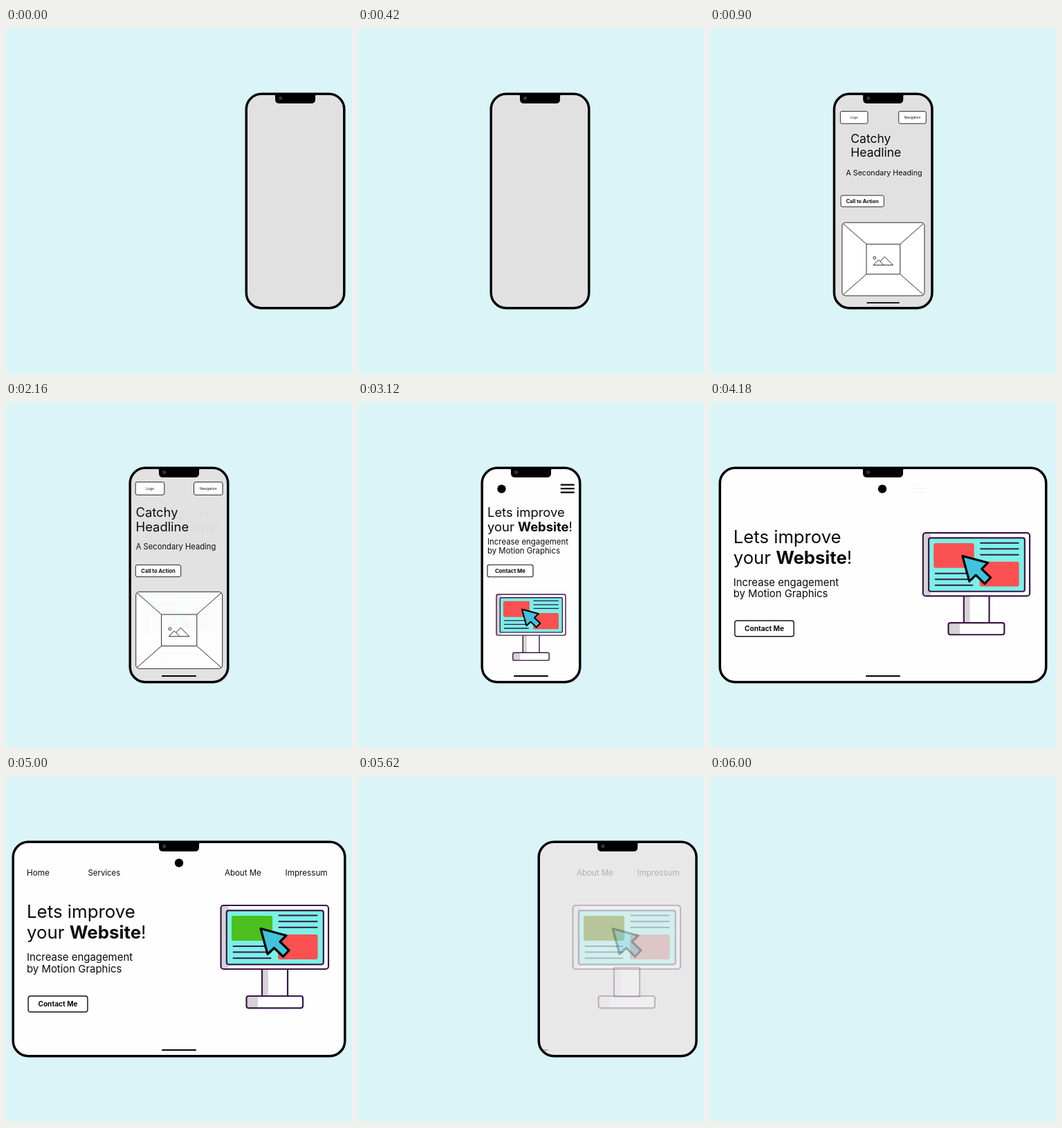
These frames come from a looping animation (500 px wide and 500 px high, 6020 ms). An HTML page with a canvas:

```html
<!DOCTYPE html>
<html lang="en">
<head>
<meta charset="utf-8">
<title>Responsive page</title>
<style>
html, body { margin: 0; width: 100%; height: 100%; overflow: hidden; background: #daf4f8 }
canvas { display: block }
</style>
</head>
<body>
<canvas id="stage" width="500" height="500"></canvas>
<script>
const ctx = document.getElementById('stage').getContext('2d');
const LOOP = 6020, SKY = '#daf4f8', INK = '#3a1648', RED = '#fb5052';

// Critically damped spring from 0 to 1.
const spring = (ms, rate = 10) => {
  const u = Math.max(0, ms) / 1000 * rate;
  return 1 - (1 + u) * Math.exp(-u);
};
const mix = (a, b, p) => a + (b - a) * p;
const grey = v => `rgb(${v},${v},${v})`;

function box(x, y, w, h, r, fill, stroke, width = 1) {
  ctx.beginPath();
  ctx.roundRect(x, y, w, h, r);
  paint(fill, stroke, width);
}
function paint(fill, stroke, width) {
  if (fill) { ctx.fillStyle = fill; ctx.fill(); }
  if (stroke) { ctx.strokeStyle = stroke; ctx.lineWidth = width; ctx.stroke(); }
}
function shape(d, fill, stroke, width) {
  const path = new Path2D(d);
  if (fill) { ctx.fillStyle = fill; ctx.fill(path); }
  if (stroke) { ctx.strokeStyle = stroke; ctx.lineWidth = width; ctx.stroke(path); }
}
function dot(x, y, r, fill, stroke, width) {
  ctx.beginPath();
  ctx.arc(x, y, r, 0, 7);
  paint(fill, stroke, width);
}
function text(s, x, y, size, weight = 400, align = 'left') {
  ctx.font = `${weight} ${size}px Inter, sans-serif`;
  ctx.textAlign = align;
  ctx.fillStyle = '#0a0a0a';
  ctx.fillText(s, x, y);
}
function group(alpha, draw) {
  if (alpha < 0.004) return;
  ctx.save();
  ctx.globalAlpha *= alpha;
  draw();
  ctx.restore();
}
function place(x, y, scale, draw) {
  ctx.save();
  ctx.translate(x, y);
  ctx.scale(scale, scale);
  draw();
  ctx.restore();
}

function homeBar(scale, y) {
  box(250 - 25 * scale, y - 0.9, 50 * scale, 1.8, 0.9, '#000');
}

function wireframe(p) {
  const away = 1 - p;
  // Each part grows around its centre while it travels in from (dx, dy).
  const part = (x, y, dx, dy, draw) => {
    if (p > 0.002) place(x + dx * away, y + dy * away, p, draw);
  };
  const label = (x, s) => part(x, 125, 0, 90, () => {
    box(-20.8, -9.3, 41.6, 18.6, 2.5, '#fff', '#222');
    text(s, 0, 1.8, 4.9, 400, 'center');
  });
  label(208, 'Logo');
  label(292.3, 'Navigation');
  part(227, 171, 290, 0, () => {
    text('Catchy', -39.5, -5, 18.4);
    text('Headline', -39.5, 16, 18.4);
  });
  part(245.5, 209, 122, 0, () => text('A Secondary Heading', 0, 3.8, 11.2, 400, 'center'));
  part(220, 244, 0, 130, () => {
    box(-32.7, -8.6, 65.4, 17.2, 2.5, '#fff', '#222');
    text('Call to Action', 0, 2.8, 7.6, 700, 'center');
  });
  part(250.2, 329.8, 0, 90, () => {
    box(-62.5, -55.5, 125, 111, 5, '#fff', '#222');
    box(-25.6, -22.8, 51.2, 45.6, 0, null, '#222');
    shape('M-61-54L-25.6-22.8M61-54L25.6-22.8M-61 54L-25.6 22.8M61 54L25.6 22.8' +
      'M-15.2 9L-7 1L1 9ZM-4.5 3.5L2 -3.7L14.8 9H1', null, '#222', 1);
    dot(-13.3, -2, 2, null, '#222', 1);
  });
  if (p > 0.002) homeBar(p, 396 + 22 * away);
}

function monitor(green) {
  const rule = (x, y, w) => box(x, y - 1, w, 2, 1, INK);
  ctx.lineJoin = 'round';
  box(370, 277, 37, 42, 0, '#fff');
  box(370, 277, 9, 42, 0, '#d6d2d6');
  box(370, 277, 37, 42, 0, null, INK, 2.2);
  box(347.5, 318, 81.5, 17.3, 3, '#fff');
  box(348, 318, 16, 17, [3, 0, 0, 3], '#d6d2d6');
  box(347.5, 318, 81.5, 17.3, 3, null, INK, 2.2);
  box(310.5, 187, 155.5, 92, 4, '#fff');
  box(311, 188, 11, 90, 3, '#d6d2d6');
  box(310.5, 187, 155.5, 92, 4, null, INK, 2.2);
  box(318.8, 194.3, 140, 78, 3, '#7bf0e6', INK, 2.2);
  box(326, 202, 59, 36, 3, RED);
  group(green, () => box(326, 202, 59, 36, 3, '#4bc11f'));
  box(393, 229, 57.5, 36, 3, RED);
  for (const k of [0, 1, 2]) {
    rule(393.5, 201.6 + 8.6 * k, 57);
    rule(327.5, 246 + 8.6 * k, 56);
  }
  shape('M368 220.5L405 230.5L396 239.5L409 252L400.5 261L387.5 248.5L378 257.5Z',
    '#41c3dc', '#000', 3.2);
}

// wide: 0 is the phone layout, 1 the tablet layout.
function page(wide, nav) {
  const at = (x0, y0, x1, y1, grow, draw) =>
    place(mix(x0, x1, wide), mix(y0, y1, wide), mix(1, grow, wide), draw);

  dot(mix(207.5, 250, wide), 125.6, 6.2, '#000');
  group(1 - wide, () => {
    for (const y of [119.6, 125.1, 130.6]) box(292.5, y - 1.1, 20.5, 2.2, 1.1, '#000');
  });
  at(187, 166, 30, 205, 1.405, () => {
    text('Lets improve', 0, 0, 18.4);
    text('your ', 0, 21.2, 18.4);
    let x = ctx.measureText('your ').width;
    text('Website', x, 21.2, 18.4, 700);
    x += ctx.measureText('Website').width;
    text('!', x, 21.2, 18.4);
  });
  at(187, 206, 30, 267, 1.31, () => {
    text('Increase engagement', 0, 0, 11.4);
    text('by Motion Graphics', 0, 13, 11.4);
  });
  at(220, 244, 75, 329.5, 1.3, () => {
    box(-33, -8.8, 66, 17.6, 2.5, '#fff', '#111', 1.1);
    text('Contact Me', 0, 2.8, 7.8, 700, 'center');
  });
  at(200, 278, 310.5, 187, 1 / 0.643, () => {
    ctx.scale(0.643, 0.643);
    ctx.translate(-310.5, -187);
    monitor(nav);
  });
  group(nav, () => {
    text('Home', 30, 144, 11.7);
    text('Services', 118.5, 144, 11.4);
    text('About Me', 316, 144, 11.5);
    text('Impressum', 403.5, 144, 11.7);
  });
  homeBar(1, 396);
}

function render(t) {
  ctx.fillStyle = SKY;
  ctx.fillRect(0, 0, 500, 500);
  if (t >= 6000) return;

  const arrive = spring(t);
  const wire = spring(t - 420);
  const design = spring(t - 2140);
  const wide = spring(t - 3620);
  const nav = spring(t - 4200);
  const leave = spring(t - 5300, 8.3);

  const shift = 168 * (1 - arrive + leave);
  const left = mix(179.25, 10.25, wide) + 168 * (1 - arrive) + 337 * leave;
  const right = mix(320.75, 489.75, wide) + 168 * (1 - arrive) - leave;
  const frame = [left, 95.3, right - left, 309.4, 22];

  ctx.save();
  box(...frame, grey(mix(225, 254, design * (1 - leave))));
  ctx.clip();
  ctx.translate(168 * (1 - arrive), 0);
  group(1 - design, () => wireframe(wire));
  group(design * (1 - leave), () => page(wide, nav));
  ctx.restore();

  box(...frame, null, '#000', 3.5);
  place(shift, 0, 1, () => {
    shape('M219 95H281Q279 96.5 279 99V103Q279 109 273 109H227Q221 109 221 103V99Q221 96.5 219 95Z', '#000');
    dot(228.7, 101.4, 3, '#242424');
    dot(228.7, 101.4, 1.6, '#3c3c3c');
  });
}

const start = performance.now();
(function tick() {
  render((performance.now() - start) % LOOP);
  requestAnimationFrame(tick);
})();
</script>
</body>
</html>
```
